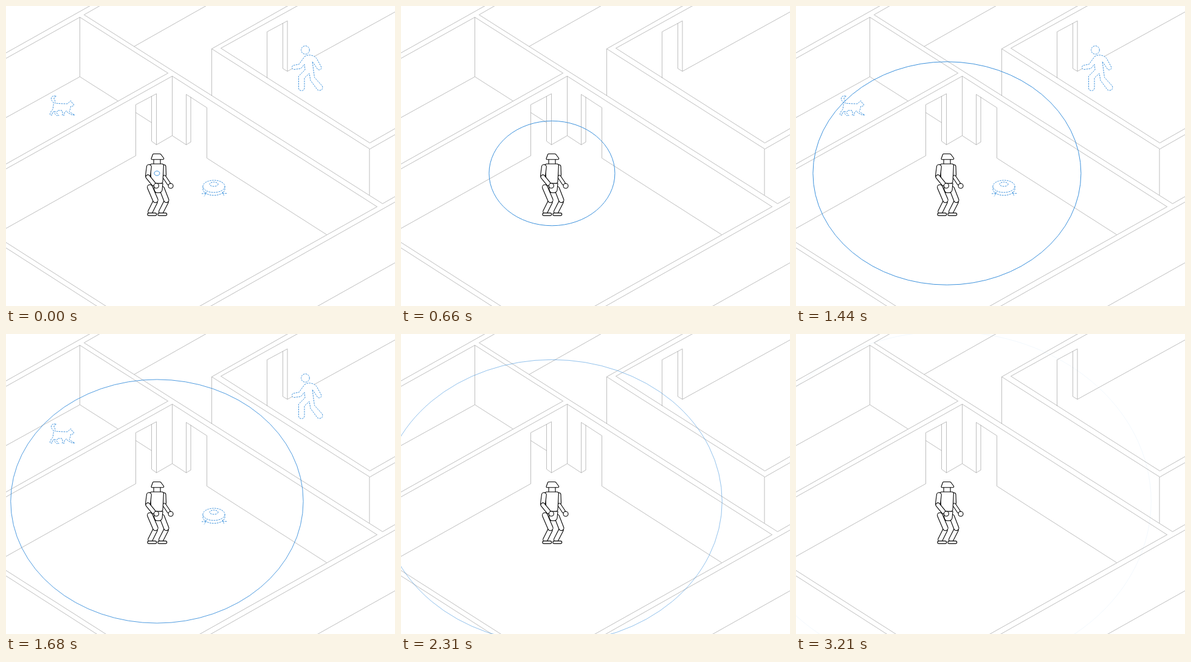
Animation of 640x494 px, one loop 3330 ms. Source, as an HTML page:

```html
<!DOCTYPE html>
<html lang="en">
<head>
<meta charset="utf-8">
<title>Robot sensing pulse</title>
<style>
  html, body { margin: 0; width: 100%; height: 100%; overflow: hidden; background: #fff; }
  svg { display: block; width: 100%; height: 100%; }
  path, ellipse, circle { stroke-linejoin: round; }
  #walls { fill: none; stroke: #999; stroke-width: .64; }
  #targets { fill: #fff; stroke: #3c91dc; stroke-width: 1; stroke-dasharray: 2.6 1.4; }
  #robot { fill: #fff; stroke: #000; stroke-width: 1.1; }
  #pulse { fill: none; stroke: #3c91dc; stroke-width: 1; }
</style>
</head>
<body>
<svg viewBox="0 0 640 494">
  <g id="walls" transform="translate(.5 .5)">
    <!-- left room -->
    <path d="M-1 77L138 -1M-1 86L121 18L266 110L-1 260M128 14L154 -1M121 18V116M-1 183.5L121 116L184 156"/>
    <!-- long wall and back corridor -->
    <path d="M128 14L619 325L641 312.500M210.500 66L329 -1"/>
    <!-- main room -->
    <path d="M-1 268L273 115L610 330L316 495M273 115V213M-1 366L213 246V162L247 144V228L273 213L296 228V145L330 167V250L527 376"/>
    <path d="M239 148V222L247 228M213 175L239 191.500M303.500 149V223.500L296 228M-1 388.500L166 495M-1 397.500L151 495M334 495L641 321.500M510 495L641 421.500"/>
    <!-- right room -->
    <path d="M463.500 -1L338 70L598 235L641 210.500M479.500 -1L353 69L598 225L641 200.500M338 70V147M597.500 235V311"/>
    <path d="M429 118V42L462.500 24V107L641 8.500M455 28V102.500L462.500 107"/>
  </g>

  <g id="targets">
    <!-- cat -->
    <path d="M82.500 148.500Q78.500 150.500 79 153Q81.500 156 80.500 160Q90 161 101 161L106.500 156L108 159Q112 161 111.500 163.500Q110 165.500 106.500 165Q106 170 104 173.500L107 176L113 179.500H109L101.500 175.500L99.500 172.500L96.500 175L95.500 180H92.500L93.500 177L92 172H85L83 176L87 180.500H83.500L80 177L81 173L76.500 175L75.500 180L72 178.500L74.500 173Q78 170 77.500 165Q79 161 77.500 158Q73 154.500 75 150Q78 147 82.500 148.500Z"/>
    <!-- person -->
    <circle cx="492.500" cy="72.500" r="6.800"/>
    <path d="M491 83.500Q497 79 505 82Q510 84 512 88L518 99Q520 103 517 105Q513 106 511 101.500L504 91.500L507.500 117.500L520.500 132Q522 138.500 516 139Q512.500 139 511 136L501 122.500L499 111L491 118.500V135Q490.500 139.500 486 139.500Q481.500 139 481.500 135V115.500L492 105L491 96L485 103L474 104.500Q470.500 104 470.500 101Q471 97.500 474 97.500L482 96Z"/>
    <!-- vacuum -->
    <path d="M324 297V302C326 315 358 315 360 302V297"/>
    <ellipse cx="342" cy="297" rx="18" ry="10"/>
    <ellipse cx="342" cy="293.500" rx="7" ry="3.500"/>
    <path fill="none" d="M322 309L329 308.500L326 313.500M329 308.500V305M363 308.500L356.500 308.500L359 312.500M356.500 308.500V305"/>
  </g>

  <g id="robot"></g>
  <ellipse id="pulse" cx="248.400" cy="275.500"/>
</svg>
<script>
const $ = id => document.getElementById(id);

// A rounded limb: a thick black line with a slightly thinner white one on top.
function limb(x1, y1, x2, y2, width) {
  const line = (color, w) => `<path d="M${x1} ${y1}L${x2} ${y2}" fill="none" ` +
    `stroke="${color}" stroke-width="${w}" stroke-linecap="round"/>`;
  return line('#000', width) + line('#fff', width - 2.2);
}
const shape = d => `<path d="${d}"/>`;
const hand = (x, y) => `<circle cx="${x}" cy="${y}" r="4"/>`;

$('robot').innerHTML = [
  limb(260, 264.5, 260.5, 278, 7),
  limb(260.5, 281.5, 267.5, 292, 6.4),
  hand(271, 296.3),
  shape('M243 251H254V262H243Z'),
  shape('M243 243.500H253Q254 243.500 255 244.500L259.500 250.500Q260 252.800 258 252.800H240.500Q238.500 252.800 239.300 250.500L241.500 244.500Q242 243.500 243 243.500Z'),
  limb(245.5, 322.5, 237.5, 338.5, 8.6),
  limb(263.5, 322.5, 255.3, 338.5, 8.6),
  limb(256.5, 301, 263.7, 319.5, 9.4),
  shape('M243 292H258L257 303Q256 307.500 252 307.500H248Q245 307 244 303Z'),
  limb(236.8, 298.5, 245.8, 319.5, 9.6),
  shape('M240 260H256.500Q259.500 260 259.300 263L258 289Q257.500 292 255 292H242Q239.500 292 239 289L237 263Q237 260 240 260Z'),
  limb(235.3, 265, 233.5, 279, 9),
  limb(233.5, 281.5, 242.5, 292.5, 8),
  hand(247.3, 296),
  limb(235, 343, 245.5, 343, 5.4),
  limb(252, 343, 262.5, 343, 5.4)
].join('');

const LOOP = 3330, STEP = 30, LAST = 3210;
const BLINK = 600, SLOWDOWN = 1530, END = 3360;

function render(time) {
  const held = Math.min(Math.floor((time % LOOP) / STEP + 1e-6) * STEP, LAST);
  const t = held + STEP;
  const slow = Math.max(0, t - SLOWDOWN);
  const rx = Math.min(t, SLOWDOWN) * .15 + slow * .0622;
  const pulse = $('pulse');
  pulse.setAttribute('rx', rx);
  pulse.setAttribute('ry', rx / 1.2);
  pulse.setAttribute('opacity', 1 - slow / (END - SLOWDOWN));
  $('targets').setAttribute('visibility', Math.floor(t / BLINK) % 2 ? 'hidden' : 'visible');
}

const start = performance.now();
function tick() {
  render(performance.now() - start);
  requestAnimationFrame(tick);
}
tick();
</script>
</body>
</html>
```
